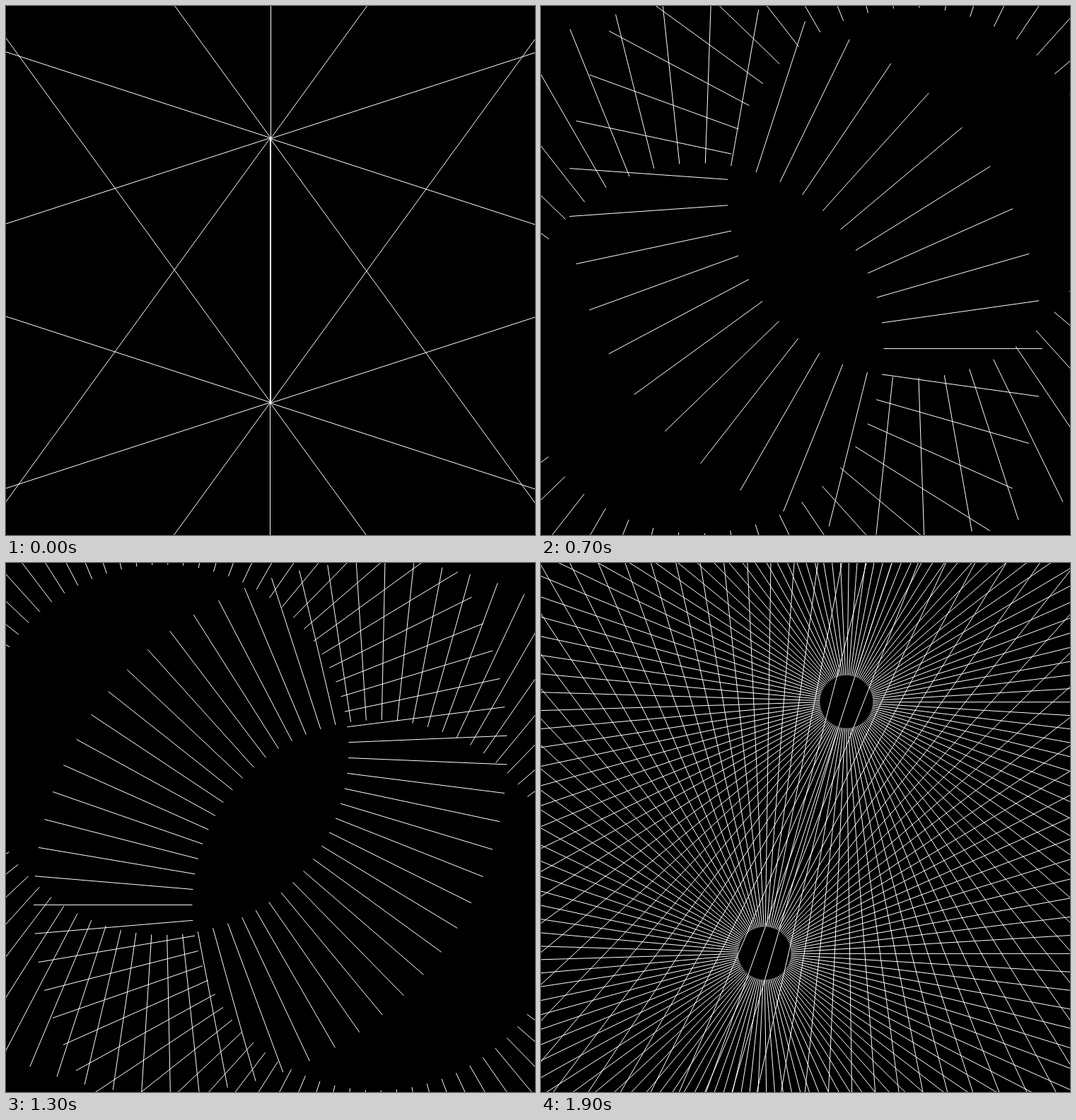
Animation of 748 by 748 pixels, one loop 2 s. Source, as an HTML page with a canvas:

```html
<!DOCTYPE html>
<html lang="en">
<head>
<meta charset="utf-8">
<title>Orbiting rays</title>
<style>
  html, body { margin: 0; width: 100%; height: 100%; overflow: hidden; background: #000; }
  canvas { display: block; }
</style>
</head>
<body>
<canvas id="stage" width="748" height="748"></canvas>
<script>
const SIZE = 748;
const STEPS = 20;
const STEP_MS = 100;
const TAU = Math.PI * 2;
const ctx = document.getElementById('stage').getContext('2d');

// One burst of rays; each ray is a 1px bar lying on the clockwise side of its angle.
function drawBurst(x, y, startAngle, count, inner, outer) {
  for (let i = 0; i < count; i++) {
    const angle = startAngle + i * TAU / count;
    const c = Math.cos(angle), s = Math.sin(angle);
    const ox = x - s / 2, oy = y + c / 2;
    ctx.beginPath();
    ctx.moveTo(ox + c * inner, oy + s * inner);
    ctx.lineTo(ox + c * outer, oy + s * outer);
    ctx.stroke();
  }
}

function drawStep(step) {
  ctx.fillStyle = '#000';
  ctx.fillRect(0, 0, SIZE, SIZE);
  ctx.strokeStyle = '#fff';
  ctx.lineWidth = 1;

  // The two ends of every ray trade places over the loop, meeting halfway.
  const near = SIZE * Math.min(step, STEPS - step) / STEPS;
  const far = SIZE - near;
  if (near === far) return;

  const orbit = -TAU / 4 - TAU * step / STEPS;
  const count = 10 + 5 * step;
  for (const side of [1, -1]) {
    const x = SIZE / 2 + side * Math.cos(orbit) * SIZE / 4;
    const y = SIZE / 2 + side * Math.sin(orbit) * SIZE / 4;
    drawBurst(x, y, orbit, count, near, far);
  }
}

const start = performance.now();
let shown = -1;

function tick() {
  const step = Math.floor((performance.now() - start) / STEP_MS) % STEPS;
  if (step !== shown) drawStep(shown = step);
  requestAnimationFrame(tick);
}
tick();
</script>
</body>
</html>
```
